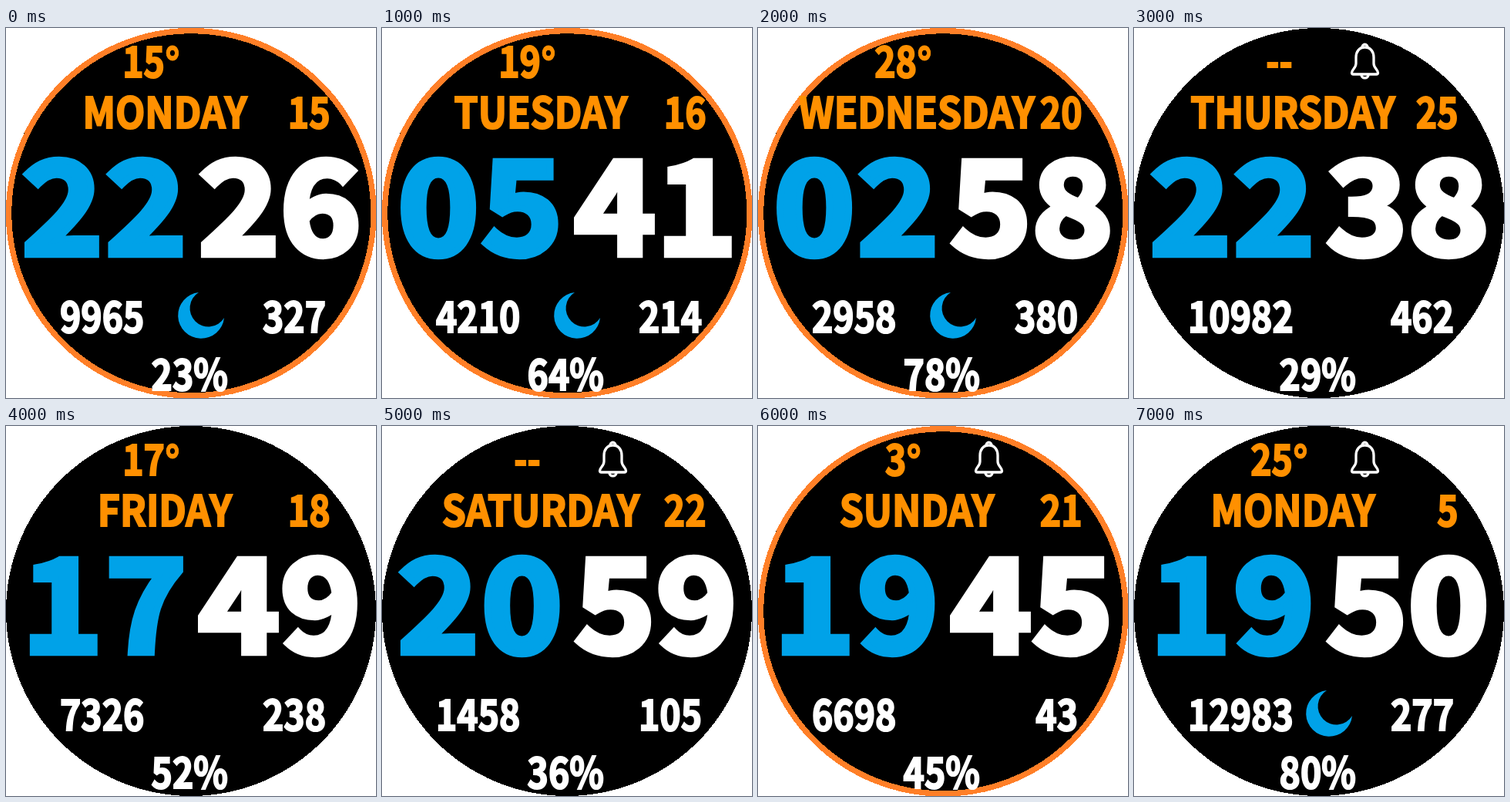
Recreate the animation shown at these times as an HTML page. Size 480 px wide and 480 px high, loop 8 s.

```html
<!DOCTYPE html>
<html lang="en">
<head>
<meta charset="utf-8">
<title>Watch face</title>
<style>
  html, body { margin: 0; width: 100%; height: 100%; overflow: hidden; background: #fff; }
  svg { display: block; width: 100vw; height: 100vh; }
  circle { shape-rendering: crispEdges; }
  text { font-family: "Noto Sans CJK JP", "Noto Sans CJK SC", "Noto Sans CJK KR", "Open Sans", sans-serif; font-weight: 700; }
  .small { font-size: 56px; stroke-width: 2.2px; }
  .big { font-size: 167.5px; stroke-width: 8.4px; stroke-linejoin: miter; }
  .degree { font-family: "Open Sans", sans-serif; stroke-width: 1px; }
  .orange { fill: #ff9000; stroke: #ff9000; }
  .blue { fill: #00a2e8; stroke: #00a2e8; }
  .white { fill: #fff; stroke: #fff; }
</style>
</head>
<body>
<svg viewBox="0 0 480 480">
  <circle cx="240" cy="240" r="240"/>
  <circle id="ring" cx="240.3" cy="240.3" r="236.7" fill="none" stroke="#ff7f27" stroke-width="7.4"/>
  <g id="bell" transform="translate(0 -1)" fill="none" stroke="#fff" stroke-width="3.3" stroke-linecap="round" stroke-linejoin="round">
    <path d="M299.5 26C292 26 288 32 288 39V47C288 53 282.5 55 282.5 59Q282.5 61 284.5 61H314.5Q316.5 61 316.5 59C316.5 55 311 53 311 47V39C311 32 307 26 299.5 26Z"/>
    <path d="M296 26a3.5 3.8 0 0 1 7 0M295 62a4.5 3.8 0 0 0 9 0"/>
  </g>
  <path id="moon" fill="#00a2e8" d="M250 343A30 30 0 1 0 283 376A24 24 0 1 1 250 343Z"/>
  <g id="labels"></g>
</svg>
<script>
const NS = "http://www.w3.org/2000/svg";
const $ = id => document.getElementById(id);
const CONDENSED = 0.828, SEMI = 0.89, WIDE = 1.06, STEP = 1000;

function addText(cls, x, y, anchor, sx) {
  const el = document.createElementNS(NS, "text");
  el.setAttribute("class", cls);
  el.setAttribute("text-anchor", anchor);
  el.setAttribute("transform", `translate(${x} ${y}) scale(${sx} 1)`);
  $("labels").append(el);
  return el;
}
const small = (cls, x, y, anchor, sx = CONDENSED) => addText("small " + cls, x, y, anchor, sx);
const digit = (cls, x) => addText("big " + cls, x, 294, "middle", WIDE);

const temp = small("orange", 188.5, 64, "middle");
const weekday = small("orange", 206, 130, "middle", SEMI);
const date = small("orange", 420.5, 130, "end");
const steps = small("white", 70, 395, "start");
const pulse = small("white", 415, 395, "end");
const battery = small("white", 238.3, 470.3, "middle");
const digits = [digit("blue", 73), digit("blue", 181.5), digit("white", 302), digit("white", 408)];

const mark = document.createElementNS(NS, "tspan");
mark.setAttribute("class", "degree");
mark.textContent = "°";

// temperature, weekday, date, time, steps, pulse, battery, ring, bell, moon
const states = [
  ["15", "MONDAY", 15, "2226", 9965, 327, 23, 1, 0, 1],
  ["19", "TUESDAY", 16, "0541", 4210, 214, 64, 1, 0, 1],
  ["28", "WEDNESDAY", 20, "0258", 2958, 380, 78, 1, 0, 1],
  ["--", "THURSDAY", 25, "2238", 10982, 462, 29, 0, 1, 0],
  ["17", "FRIDAY", 18, "1749", 7326, 238, 52, 0, 0, 0],
  ["--", "SATURDAY", 22, "2059", 1458, 105, 36, 0, 1, 0],
  ["3", "SUNDAY", 21, "1945", 6698, 43, 45, 1, 1, 0],
  ["25", "MONDAY", 5, "1950", 12983, 277, 80, 0, 1, 1]
];

function show(id, on) { $(id).style.display = on ? "" : "none"; }

function render(state) {
  const [deg, day, num, time, walked, beat, charge, ring, bell, moon] = state;
  temp.textContent = deg;
  if (deg !== "--") temp.append(mark);
  weekday.textContent = day;
  date.textContent = num;
  digits.forEach((el, i) => el.textContent = time[i]);
  steps.textContent = walked;
  pulse.textContent = beat;
  battery.textContent = charge + "%";
  show("ring", ring);
  show("bell", bell);
  show("moon", moon);
}

const start = performance.now();
let current = -1;
function tick(now) {
  const i = Math.floor(Math.max(0, now - start) / STEP) % states.length;
  if (i !== current) render(states[current = i]);
  requestAnimationFrame(tick);
}
tick(start);
</script>
</body>
</html>
```
